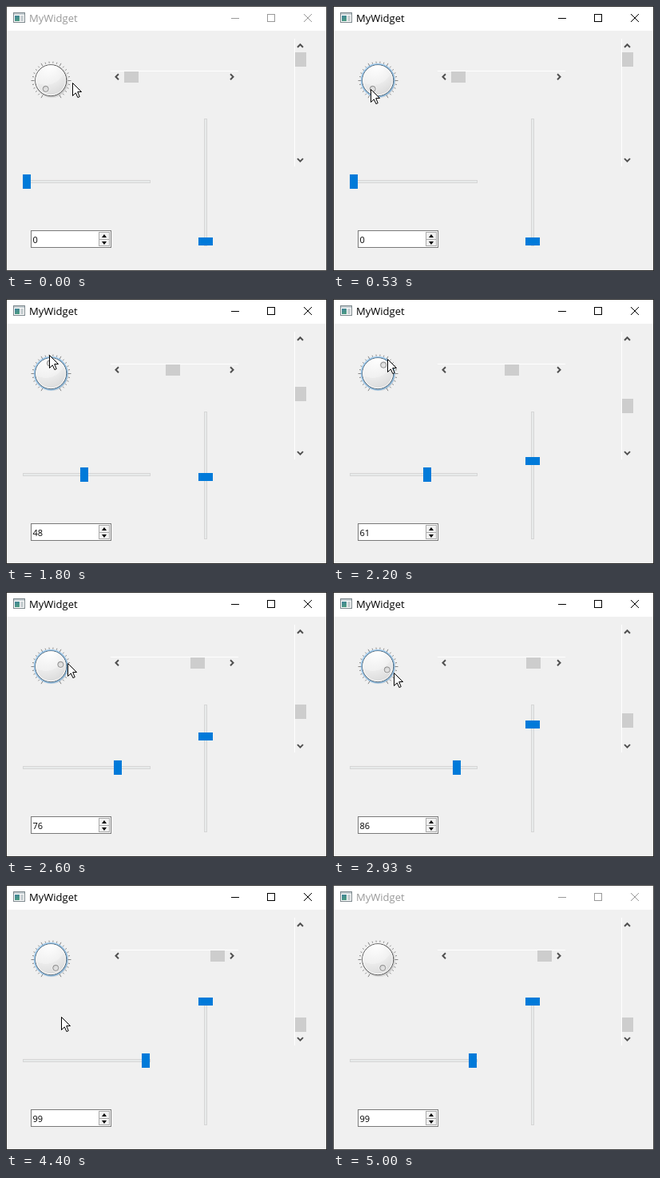
These frames come from a looping animation (402 px wide and 332 px high, 5.07 s). An HTML page with a canvas:

```html
<!DOCTYPE html>
<html lang="en">
<head>
<meta charset="utf-8">
<title>MyWidget</title>
<style>
  html, body { margin: 0; width: 100%; height: 100%; overflow: hidden; background: #f0f0f0; }
  canvas { display: block; }
</style>
</head>
<body>
<canvas id="stage" width="402" height="332"></canvas>
<script>
const g = document.getElementById('stage').getContext('2d');
const LOOP = 5070, TICK = 1000 / 15, TAU = Math.PI * 2;
const CX = 56, CY = 93, R = 25;

// [tick, dial value, cursor distance from the dial centre]
const DRAG = [[11, 0, 14.2], [18, 35, 20], [27, 48, 23], [35, 65, 22], [39, 76, 21.4], [50, 99, 22]];

const mix = (a, b, p) => a + (b - a) * p;
const gray = (v, a = 1) => `rgba(${v},${v},${v},${a})`;
const dialAngle = p => (8 - 10 * p) * Math.PI / 6;

function rect(x, y, w, h, fill) {
  g.fillStyle = fill;
  g.fillRect(x, y, w, h);
}

function box(x, y, w, h, fill, line) {
  rect(x, y, w, h, line);
  rect(x + 1, y + 1, w - 2, h - 2, fill);
}

function path(points, line, width = 1, fill) {
  g.beginPath();
  points.forEach(([x, y]) => g.lineTo(x, y));
  if (fill) { g.closePath(); g.fillStyle = fill; g.fill(); }
  if (line) { g.strokeStyle = line; g.lineWidth = width; g.stroke(); }
}

function circle(x, y, r, fill, line, width = 1) {
  g.beginPath();
  g.arc(x, y, r, 0, TAU);
  if (fill) { g.fillStyle = fill; g.fill(); }
  if (line) { g.strokeStyle = line; g.lineWidth = width; g.stroke(); }
}

function radial(fx, fy, cx, cy, r, stops) {
  const grad = g.createRadialGradient(fx, fy, 0, cx, cy, r);
  stops.forEach(([at, color]) => grad.addColorStop(at, color));
  return grad;
}

function text(str, x, y, size, color) {
  g.font = `${size}px "Open Sans", "Noto Sans", sans-serif`;
  g.fillStyle = color;
  g.fillText(str, x, y);
}

function chevron(x, y, dx, dy) {
  const at = (along, side) => [x + dx * along + dy * side, y + dy * along + dx * side];
  path([at(-1.7, -3.5), at(1.8, 0), at(-1.7, 3.5)], '#505050', 2);
}

function drawWindow(active) {
  const ink = active ? '#000' : '#999';
  box(0, 0, 402, 332, '#f0f0f0', active ? '#2b2b2b' : '#434343');
  rect(1, 1, 400, 30, '#fff');

  box(9, 8, 15, 13, '#fff', '#7c878c');
  rect(10, 9, 13, 2, '#c3ccd0');
  const teal = g.createLinearGradient(11, 11, 16, 20);
  teal.addColorStop(0, '#3f7f9c');
  teal.addColorStop(1, '#4fa07c');
  rect(11, 12, 6, 7, teal);
  rect(18, 12, 4, 7, '#c9d0d3');

  text('MyWidget', 29, 20, 13, ink);
  rect(282, 15, 10, 1, ink);
  box(327, 10, 10, 10, '#fff', ink);
  path([[373, 10], [383, 20]], ink);
  path([[383, 10], [373, 20]], ink);
}

function drawDial(p, focus) {
  for (let i = 0; i <= 25; i++) {
    const a = dialAngle(i / 25), big = i % 5 === 0;
    const at = r => [CX + .5 + r * Math.cos(a), CY + .5 - r * Math.sin(a)];
    path([at(big ? R - 4 : R - 3), at(big ? R : R - 1)], '#858585');
  }

  const x = CX + .17, y = CY + .17, r = 19.5;
  circle(x + 1, y + 1, r + 2, radial(x + 1, y + 1, x + 1, y + 1, r + 2,
    [[.91, gray(0, .157)], [1, gray(0, 0)]]));
  circle(x, y, r, radial(x, y - r, x - 13, y - 20, 50.7,
    [[0, gray(255)], [.5, gray(240)], [.501, gray(235)], [1, gray(209)]]), gray(86));
  circle(x, y, r - 1, null, '#fff');
  if (focus) circle(x, y, r + 1, null, 'rgba(86,166,230,.5)', 2);

  const a = dialAngle(p), ds = R / 7, w = ds * 2;
  const dx = CX + 12.6 * Math.cos(a), dy = CY - 12.6 * Math.sin(a);
  circle(dx, dy, ds + 1, radial(dx, dy, dx + ds, dy + w, w * 2,
    [[0, gray(227, .8)], [.4, gray(208, .8)], [1, gray(178, .8)]]), gray(255, .59));
  circle(dx, dy, ds, null, gray(0, .314));
}

function drawScrollBars(p) {
  const shift = Math.round(108 * p);
  rect(131, 81, 160, 1, '#fff');
  rect(361, 41, 1, 160, '#fff');
  rect(148 + shift, 82, 18, 14, '#cdcdcd');
  rect(362, 58 + shift, 14, 18, '#cdcdcd');
  chevron(139.3, 88.8, -1, 0);
  chevron(282.7, 88.8, 1, 0);
  chevron(368.5, 50, 0, -1);
  chevron(368.5, 192.8, 0, 1);
}

function drawSliders(p) {
  const shift = Math.round(149 * p);
  box(21, 218, 160, 4, '#e7eaea', '#d6d6d6');
  box(248, 141, 4, 160, '#e7eaea', '#d6d6d6');
  rect(21 + shift, 211, 10, 18, '#007ad9');
  rect(241, 290 - shift, 18, 10, '#007ad9');
}

function drawSpinBox(value, hover) {
  box(31, 281, 101, 22, '#fff', hover ? '#171717' : '#7a7a7a');
  box(116, 283, 14, 10, '#f0f0f0', '#ababab');
  box(116, 292, 14, 9, '#f0f0f0', '#ababab');
  path([[120, 290], [123, 286], [126, 290]], null, 1, '#000');
  path([[120, 295], [123, 299], [126, 295]], null, 1, '#000');
  text(value, 33.5, 297, 11, '#000');
}

function drawCursor(x, y, beam) {
  g.save();
  g.translate(Math.round(x), Math.round(y));
  if (beam) {
    rect(0, -8, 1, 16, '#000');
    rect(-3, -8, 7, 1, '#000');
    rect(-3, 8, 7, 1, '#000');
  } else {
    path([[.5, .5], [.5, 16.5], [4.3, 12.9], [6.9, 18.6], [9.2, 17.6], [6.7, 11.6], [11.5, 11.5], [.5, .5]],
      '#000', 1, '#fff');
  }
  g.restore();
}

function dragAt(k) {
  const i = DRAG.findIndex(d => k < d[0]);
  if (i === 0) return DRAG[0].slice(1);
  if (i < 0) return DRAG[DRAG.length - 1].slice(1);
  const a = DRAG[i - 1], b = DRAG[i], p = (k - a[0]) / (b[0] - a[0]);
  return [mix(a[1], b[1], p), mix(a[2], b[2], p)];
}

function cursorAt(k, value, dist) {
  if (k < 5) {
    const p = 1 - (1 - k / 5) ** 1.5;
    return [mix(83, 47, p), mix(96, 104, p)];
  }
  if (k <= 11) return [47, 104];
  if (k > 64) {
    const p = (k - 64) / 8;
    return [mix(67, 75, p), mix(112, 325, p)];
  }
  const a = dialAngle(value / 99);
  return [CX + dist * Math.cos(a), CY - dist * Math.sin(a)];
}

function draw(ms) {
  const k = Math.floor((ms % LOOP + 4) / TICK);
  const active = k >= 8 && k < 75;
  const [raw, dist] = dragAt(k);
  const value = Math.round(raw), p = value / 99;
  const [x, y] = cursorAt(k, raw, dist);
  const hover = x > 31 && x < 132 && y > 281 && y < 303;

  drawWindow(active);
  drawDial(p, active);
  drawScrollBars(p);
  drawSliders(p);
  drawSpinBox(value, hover);
  if (k < 73) drawCursor(x, y, hover);
}

const start = performance.now();
function frame() {
  draw(performance.now() - start);
  requestAnimationFrame(frame);
}
frame();
</script>
</body>
</html>
```
